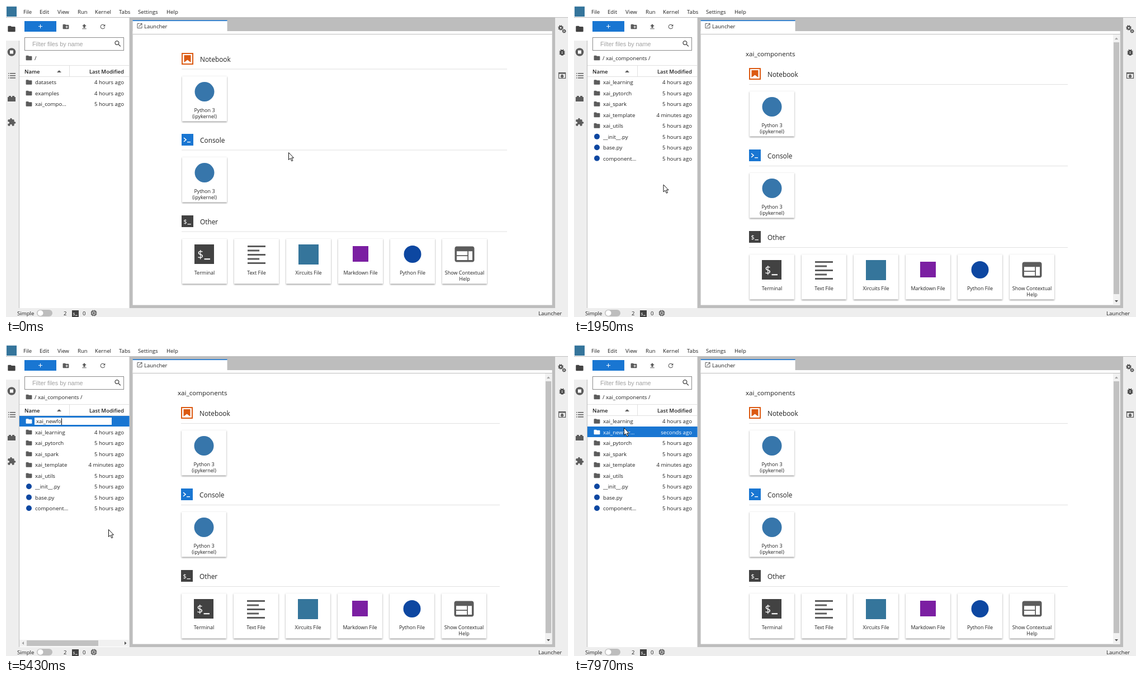
An HTML page with a canvas for the animation above (8 s loop, 1005 by 557 pixels).

```html
<!DOCTYPE html>
<html lang="en">
<head>
<meta charset="utf-8">
<title>Creating a component folder</title>
<style>
html, body { margin: 0; width: 100%; height: 100%; overflow: hidden; background: #fff; }
canvas { display: block; }
</style>
</head>
<body>
<canvas id="stage" width="1005" height="557"></canvas>
<script>
const ctx = document.getElementById('stage').getContext('2d');
const LOOP = 8000;
const BLUE = '#1976d2', GRAY = '#bdbdbd', LIGHT = '#eeeeee', LINE = '#e0e0e0', INK = '#212121', ICON = '#5c5c5c';
const SANS = '"Open Sans", "Noto Sans", sans-serif';

// Icon outlines on a 24-unit grid
const paths = {
  folder: 'M10 4H4c-1.1 0-2 .9-2 2v12c0 1.1.9 2 2 2h16c1.1 0 2-.9 2-2V8c0-1.1-.9-2-2-2h-8z',
  newFolder: 'M20 6h-8l-2-2H4c-1.1 0-2 .9-2 2v12c0 1.1.9 2 2 2h16c1.1 0 2-.9 2-2V8c0-1.1-.9-2-2-2zm-1 8h-3v3h-2v-3h-3v-2h3V9h2v3h3z',
  upload: 'M5 20h14v-2H5zm4-4h6v-6h4l-7-7-7 7h4z',
  refresh: 'M17.65 6.35C16.2 4.9 14.2 4 12 4c-4.4 0-8 3.6-8 8s3.6 8 8 8c3.7 0 6.8-2.5 7.7-6h-2.1c-.8 2.3-3 4-5.6 4-3.3 0-6-2.7-6-6s2.7-6 6-6c1.7 0 3.1.7 4.2 1.8L13 11h7V4z',
  search: 'M15.5 14h-.8l-.3-.3C15.4 12.6 16 11.1 16 9.5 16 5.9 13.1 3 9.5 3S3 5.9 3 9.5 5.9 16 9.5 16c1.6 0 3.1-.6 4.2-1.6l.3.3v.8l5 5 1.5-1.5zm-6 0C7 14 5 12 5 9.5S7 5 9.5 5 14 7 14 9.5 12 14 9.5 14z',
  puzzle: 'M20.5 11H19V7c0-1.1-.9-2-2-2h-4V3.5C13 2.1 11.9 1 10.5 1S8 2.1 8 3.5V5H4c-1.1 0-2 .9-2 2v3.8h1.5c1.5 0 2.7 1.2 2.7 2.7s-1.2 2.7-2.7 2.7H2V20c0 1.1.9 2 2 2h3.8v-1.5c0-1.5 1.2-2.7 2.7-2.7s2.7 1.2 2.7 2.7V22H17c1.1 0 2-.9 2-2v-4h1.5c1.4 0 2.5-1.1 2.5-2.5S21.9 11 20.5 11z',
  bug: 'M20 8h-2.8c-.5-.8-1-1.5-1.8-2L17 4.4 15.6 3l-2.2 2.2a6 6 0 0 0-2.8 0L8.4 3 7 4.4 8.6 6c-.8.5-1.4 1.2-1.8 2H4v2h2.1L6 12H4v2h2l.1 2H4v2h2.8a6 6 0 0 0 10.4 0H20v-2h-2.1l.1-2h2v-2h-2l-.1-2H20zm-6 8h-4v-2h4zm0-4h-4v-2h4z',
  open: 'M19 19H5V5h7V3H5c-1.1 0-2 .9-2 2v14c0 1.1.9 2 2 2h14c1.1 0 2-.9 2-2v-7h-2zM14 3v2h3.6l-9.8 9.8 1.4 1.4L19 6.4V10h2V3z',
  paste: 'M19 2h-4.2a3 3 0 0 0-5.6 0H5c-1.1 0-2 .9-2 2v16c0 1.1.9 2 2 2h14c1.1 0 2-.9 2-2V4c0-1.1-.9-2-2-2zm0 18H5V4h2v3h10V4h2z',
  panes: 'M20 4H4c-1.1 0-2 .9-2 2v12c0 1.1.9 2 2 2h16c1.1 0 2-.9 2-2V6c0-1.1-.9-2-2-2zm-5 14H4v-4h11zm0-5H4V9h11zm5 5h-4V9h4z'
};
for (const key in paths) paths[key] = new Path2D(paths[key]);
const arrow = new Path2D('M0 0V13l3-2.8 2.3 5 2.1-.9-2.2-4.8H9z');

function rect(x, y, w, h, color) {
  ctx.fillStyle = color;
  ctx.fillRect(x, y, w, h);
}

function frame(x, y, w, h, color) {
  ctx.strokeStyle = color;
  ctx.lineWidth = 1;
  ctx.strokeRect(x + .5, y + .5, w - 1, h - 1);
}

function disc(x, y, r, color) {
  ctx.fillStyle = color;
  ctx.beginPath();
  ctx.arc(x, y, r, 0, Math.PI * 2);
  ctx.fill();
}

function ring(x, y, r, width, color, dash = []) {
  ctx.strokeStyle = color;
  ctx.lineWidth = width;
  ctx.setLineDash(dash);
  ctx.beginPath();
  ctx.arc(x, y, r, 0, Math.PI * 2);
  ctx.stroke();
  ctx.setLineDash([]);
}

function poly(points, color) {
  ctx.fillStyle = color;
  ctx.beginPath();
  points.forEach(p => ctx.lineTo(...p));
  ctx.fill();
}

function polyline(points, color, width) {
  ctx.strokeStyle = color;
  ctx.lineWidth = width;
  ctx.beginPath();
  points.forEach(p => ctx.lineTo(...p));
  ctx.stroke();
}

// y is the middle of the capital letters; baselines sit on whole pixels
function text(str, x, y, { size = 9.65, color = INK, align = 'left', weight = 400, family = SANS } = {}) {
  ctx.font = `${weight} ${size}px ${family}`;
  ctx.fillStyle = color;
  ctx.textAlign = align;
  ctx.fillText(str, x, Math.round(y + size * .39));
  return ctx.measureText(str).width;
}

function icon(name, x, y, size, color = ICON) {
  ctx.save();
  ctx.translate(x - size / 2, y - size / 2);
  ctx.scale(size / 24, size / 24);
  ctx.fillStyle = color;
  ctx.fill(paths[name], 'evenodd');
  ctx.restore();
}

function bars(x, y, w, h, pitch, color = ICON) {
  for (let i = 0; i < 5; i++) rect(x, y + i * pitch, i % 2 ? w * .66 : w, h, color);
}

function terminal(x, y, s) {
  rect(x, y, s, s, '#424242');
  text('$', x + s * .15, y + s * .5, { size: s * .55, color: '#fff' });
  rect(x + s * .5, y + s * .72, s * .3, Math.max(1, s * .06), '#fff');
}

function consoleIcon(x, y) {
  rect(x, y, 21, 21, BLUE);
  polyline([[x + 4, y + 7], [x + 8, y + 10.5], [x + 4, y + 14]], '#fff', 1.6);
  rect(x + 10, y + 14, 6, 1.4, '#fff');
}

function notebookIcon(x, y) {
  ctx.strokeStyle = '#dc5a12';
  ctx.lineWidth = 2;
  ctx.strokeRect(x + 1, y + 1, 19, 19);
  poly([[x + 4.5, y + 4], [x + 16.5, y + 4], [x + 16.5, y + 17], [x + 10.5, y + 12.5], [x + 4.5, y + 17]], '#dc5a12');
}

function gear(x, y, r) {
  ring(x, y, r * .65, r * .5, '#4a4a4a');
  ring(x, y, r, r * .4, '#4a4a4a', [r * .393, r * .393]);
}

function chip(x, y) {
  ctx.strokeStyle = '#424242';
  ctx.lineWidth = 1.3;
  ctx.strokeRect(x - 3.5, y - 3.5, 7, 7);
  rect(x - 1.5, y - 1.5, 3, 3, '#424242');
  for (const d of [-2, 1]) {
    rect(x + d, y - 5.5, 1, 11, '#424242');
    rect(x - 5.5, y + d, 11, 1, '#424242');
  }
  rect(x - 2.5, y - 2.5, 5, 5, LIGHT);
  rect(x - 1.5, y - 1.5, 3, 3, '#424242');
}

function drawChrome() {
  rect(0, 0, 1005, 557, '#fff');
  rect(0, 20, 1005, 521, GRAY);
  rect(1, 1, 18, 18, '#35759b');
  const menus = { File: 31, Edit: 60, View: 92, Run: 128, Kernel: 159, Tabs: 202, Settings: 236, Help: 287 };
  for (const name in menus) text(name, menus[name], 10.5);

  rect(0, 21, 23, 520, LIGHT);
  rect(0, 21, 24, 41, '#fff');
  icon('folder', 10, 41, 16, '#424242');
  disc(10, 82.5, 7.3, ICON);
  rect(7, 79.5, 6, 6, '#fff');
  for (let y = 120; y < 130; y += 4) {
    rect(4, y, 1.5, 1.5, ICON);
    rect(7, y, 10, 1.5, ICON);
  }
  rect(3, 163, 14, 8, ICON);
  rect(5, 161, 4, 3, ICON);
  rect(11, 161, 4, 3, ICON);
  icon('puzzle', 10, 208, 16);

  rect(982, 21, 23, 520, LIGHT);
  gear(992, 39, 4);
  gear(998, 45, 3);
  icon('bug', 994.5, 83, 15, '#424242');
  ctx.strokeStyle = ICON;
  ctx.lineWidth = 1.2;
  ctx.strokeRect(988.5, 119.5, 12, 10);
  rect(988, 119, 13, 2.5, ICON);
  icon('bug', 994.5, 125.5, 8, '#424242');

  rect(0, 541, 1005, 16, LIGHT);
  text('Simple', 20, 550);
  ctx.fillStyle = GRAY;
  ctx.beginPath();
  ctx.roundRect(55, 544, 28, 12, 6);
  ctx.fill();
  disc(61.5, 550, 5, '#fff');
  text('2', 103, 550);
  terminal(118, 545, 12);
  text('0', 137, 550);
  chip(157, 550);
  text('Launcher', 994, 550, { align: 'right' });
}

const otherCards = [
  ['Terminal', (x, y) => terminal(x - 18, y - 17.5, 35)],
  ['Text File', (x, y) => bars(x - 16, y - 15.5, 32, 3, 7.5)],
  ['Xircuits File', (x, y) => rect(x - 18, y - 17.5, 36, 36, '#35759b')],
  ['Markdown File', (x, y) => rect(x - 14, y - 14.5, 28, 28, '#7b1fa2')],
  ['Python File', (x, y) => disc(x, y, 15.5, '#0d47a1')],
  ['Show Contextual|Help', (x, y) => icon('panes', x, y, 42)]
];
const kernelCard = [['Python 3|(ipykernel)', (x, y) => disc(x, y, 17.5, '#3776ab')]];
const sections = [
  ['Notebook', notebookIcon, kernelCard],
  ['Console', consoleIcon, kernelCard],
  ['Other', (x, y) => terminal(x, y, 21), otherCards]
];

function drawCard(x, y, label, art) {
  ctx.save();
  ctx.shadowColor = 'rgba(0,0,0,.4)';
  ctx.shadowBlur = 2.5;
  ctx.shadowOffsetY = 1;
  rect(x, y, 80, 80.5, '#fff');
  ctx.restore();
  art(x + 40, y + 27.5);
  label.split('|').forEach((line, i) => text(line, x + 40, y + 60.5 + i * 11, { size: 9, align: 'center' }));
}

function drawLauncher(inFolder) {
  rect(226.6, 45, 750, 490.6, '#fff');
  rect(226.6, 50, 750, 1, GRAY);
  rect(226.6, 26, 169, 24, '#fff');
  rect(226.6, 25.4, 169, 1.6, BLUE);
  icon('open', 239, 35.5, 12);
  text('Launcher', 247, 36, { size: 9.5 });

  const left = inFolder ? 313 : 314, pitch = inFolder ? 146 : 145.4, top = inFolder ? 27 : 0;
  if (inFolder) {
    text('xai_components', 307, 85, { size: 11.6 });
    rect(964, 51, 12, 485, '#f1f1f1');
    rect(965, 65, 10, 451, '#c1c1c1');
    poly([[967, 60], [973, 60], [970, 56.5]], '#a3a3a3');
    poly([[967, 527], [973, 527], [970, 530.5]], '#505050');
  }
  sections.forEach(([title, art, cards], i) => {
    const y = top + Math.round(i * pitch);
    art(left, y + 84);
    text(title, left + 33, y + 95, { size: 11.85 });
    rect(left, y + (inFolder ? 113 : 112.5), inFolder ? 570 : 582, 1, LINE);
    cards.forEach(([label, draw], n) => drawCard(left + 1 + n * 93, y + 126, label, draw));
  });
}

const rootItems = [['datasets', '4 hours ago'], ['examples', '4 hours ago'], ['xai_compo...', '5 hours ago']];
const folderItems = [
  ['xai_learning', '4 hours ago'], ['xai_pytorch', '5 hours ago'], ['xai_spark', '5 hours ago'],
  ['xai_template', '4 minutes ago'], ['xai_utils', '5 hours ago'], ['__init__.py', '5 hours ago'],
  ['base.py', '5 hours ago'], ['component...', '5 hours ago']
];
const NEW_NAME = 'xai_newforests';
const keyTimes = [3490, 3620, 3890, 4350, 4750, 4820, 4890, 5150, 5430, 5500, 5700, 5810, 5920, 6030];

function listing(t) {
  if (t < 1280) return { items: rootItems, selected: t >= 1080 ? 2 : -1 };
  if (t < 3100) return { items: folderItems, selected: -1 };
  const row = t < 6570 ? 0 : 1;
  const items = folderItems.slice();
  items.splice(row, 0, [row ? 'xai_newfor...' : 'Untitled Fo...', 'seconds ago']);
  return { items, selected: row };
}

function drawEditor(t) {
  rect(51, 130, 138, 13, '#fff');
  const typed = keyTimes.filter(k => k <= t).length;
  if (typed) {
    const width = text(NEW_NAME.slice(0, typed), 54, 136.5);
    rect(Math.round(54 + width), 131, 1, 12, '#000');
  } else {
    rect(53, 131, 70, 12, BLUE);
    text('Untitled Folder', 54, 136.5, { color: '#fff' });
  }
  rect(24, 528, 196.6, 12, '#f1f1f1');
  rect(37, 529, 128, 10, '#c1c1c1');
  poly([[32, 531], [32, 537], [28.5, 534]], '#a3a3a3');
  poly([[212, 531], [212, 537], [215.5, 534]], '#505050');
}

function drawFiles(t, cursor, menuOpen) {
  rect(24, 21, 196.6, 520, '#fff');
  rect(33, 27, 57, 19, BLUE);
  rect(58, 36, 7, 1, '#fff');
  rect(61, 33, 1, 7, '#fff');
  icon('newFolder', 107, 37, 13);
  icon('upload', 140, 37, 13);
  icon('refresh', 173, 37, 13);
  frame(33, 56, 178, 24, '#8a8a8a');
  text('Filter files by name', 47, 68, { size: 10.8, color: '#a0a0a0', family: '"Liberation Sans", Arial, sans-serif' });
  icon('search', 200, 67.5, 15, '#424242');
  icon('folder', 41, 93, 13);
  text(t < 1280 ? '/' : '/ xai_components /', 51, 93);

  const focused = t >= 6490 && t < 7700;
  const editing = t >= 3160 && t < 6490;
  const shift = focused ? 1 : 0;
  rect(24, 106, 196.6, 1, LINE);
  rect(24, 126 + shift, 196.6, 1, LINE);
  rect(113 - shift, 107, 1, 19, LINE);
  text('Name', 33 + shift, 117 + shift, { weight: 600, size: 9.5 });
  text('Last Modified', 211 - shift, 117 + shift, { weight: 600, size: 9.5, align: 'right' });
  poly([[91 - shift, 119 + shift], [99 - shift, 119 + shift], [95 - shift, 115 + shift]], ICON);

  const { items, selected } = listing(t);
  items.forEach(([name, age], i) => {
    const top = Math.round(127 + shift * .7 + i * 19.47), mid = 136.5 + shift * .8 + i * 19.47;
    const active = i === selected;
    const hover = !menuOpen && cursor.x < 221 && cursor.y >= top && cursor.y < top + 19.4;
    if (active || hover) rect(24, top, 196.6, 19, active ? BLUE : LIGHT);
    const color = active ? '#fff' : INK;
    if (/\.py$|^comp/.test(name)) disc(41 + shift, mid, 5, '#0d47a1');
    else icon('folder', 41 + shift, mid, 13, active ? '#fff' : ICON);
    if (active && editing) return;
    text(focused && name === 'component...' ? 'componen...' : name, 52 + shift, mid, { color });
    text(age, 211 - shift, mid, { color, align: 'right' });
  });
  if (editing) drawEditor(t);
  if (focused) frame(24, 106, 197, 435, BLUE);
}

function drawMenu(cursor) {
  ctx.save();
  ctx.shadowColor = 'rgba(0,0,0,.4)';
  ctx.shadowBlur = 6;
  ctx.shadowOffsetX = 1;
  ctx.shadowOffsetY = 2;
  rect(160, 320, 253, 102, '#fff');
  ctx.restore();
  frame(159, 320, 255, 102, GRAY);
  if (cursor.y > 323) rect(160, 324, 253, 19, LIGHT);
  const style = { size: 9.75 };
  ['New Folder', 'New File', 'New Markdown File', 'Paste'].forEach((label, i) => text(label, 183, 333.5 + i * 19, style));
  text('Shift+Right Click for Browser Menu', 183, 409.5, { ...style, color: '#a8a8a8' });
  text('Ctrl+V', 396, 390.5, { ...style, align: 'right' });
  rect(183, 395, 6, 1, INK);
  icon('newFolder', 172, 333.5, 13);
  bars(167, 348, 10, 1.2, 2.1);
  rect(168, 367.5, 8, 8, '#7b1fa2');
  icon('paste', 172, 391, 12);
}

// start, end, number of steps, destination
const moves = [
  [390, 940, 9, 182, 176],
  [1610, 1950, 6, 160, 320],
  [2620, 2830, 4, 178, 333],
  [3030, 3160, 3, 183.5, 330.5],
  [7300, 7440, 3, 89.5, 148.5]
];

function cursorAt(t) {
  let x = 505.5, y = 262.5;
  for (const [start, end, steps, toX, toY] of moves) {
    if (t < start) break;
    const step = Math.floor((t - start) / (end - start) * (steps - 1) + 1e-6) + 1;
    const p = Math.min(1, step / steps), ease = p * p * (3 - 2 * p);
    x += (toX - x) * ease;
    y += (toY - y) * ease;
  }
  return { x, y };
}

const clicks = [[1080, 1150], [1210, 1350], [2020, 2220], [2830, 3030], [7700, 7970]];

function draw(t) {
  const cursor = cursorAt(t);
  const menuOpen = t >= 2120 && t < 3030;
  drawChrome();
  drawLauncher(t >= 1350);
  drawFiles(t, cursor, menuOpen);
  if (menuOpen) drawMenu(cursor);
  if (clicks.some(([from, to]) => t >= from && t < to)) disc(cursor.x - 1, cursor.y + 1, 11, 'rgba(246,232,40,.72)');
  ctx.save();
  ctx.translate(cursor.x, cursor.y);
  ctx.fillStyle = '#fff';
  ctx.fill(arrow);
  ctx.strokeStyle = '#111';
  ctx.lineWidth = 1;
  ctx.stroke(arrow);
  ctx.restore();
}

const began = performance.now();
function tick() {
  draw((performance.now() - began) % LOOP);
  requestAnimationFrame(tick);
}
tick();
</script>
</body>
</html>
```
